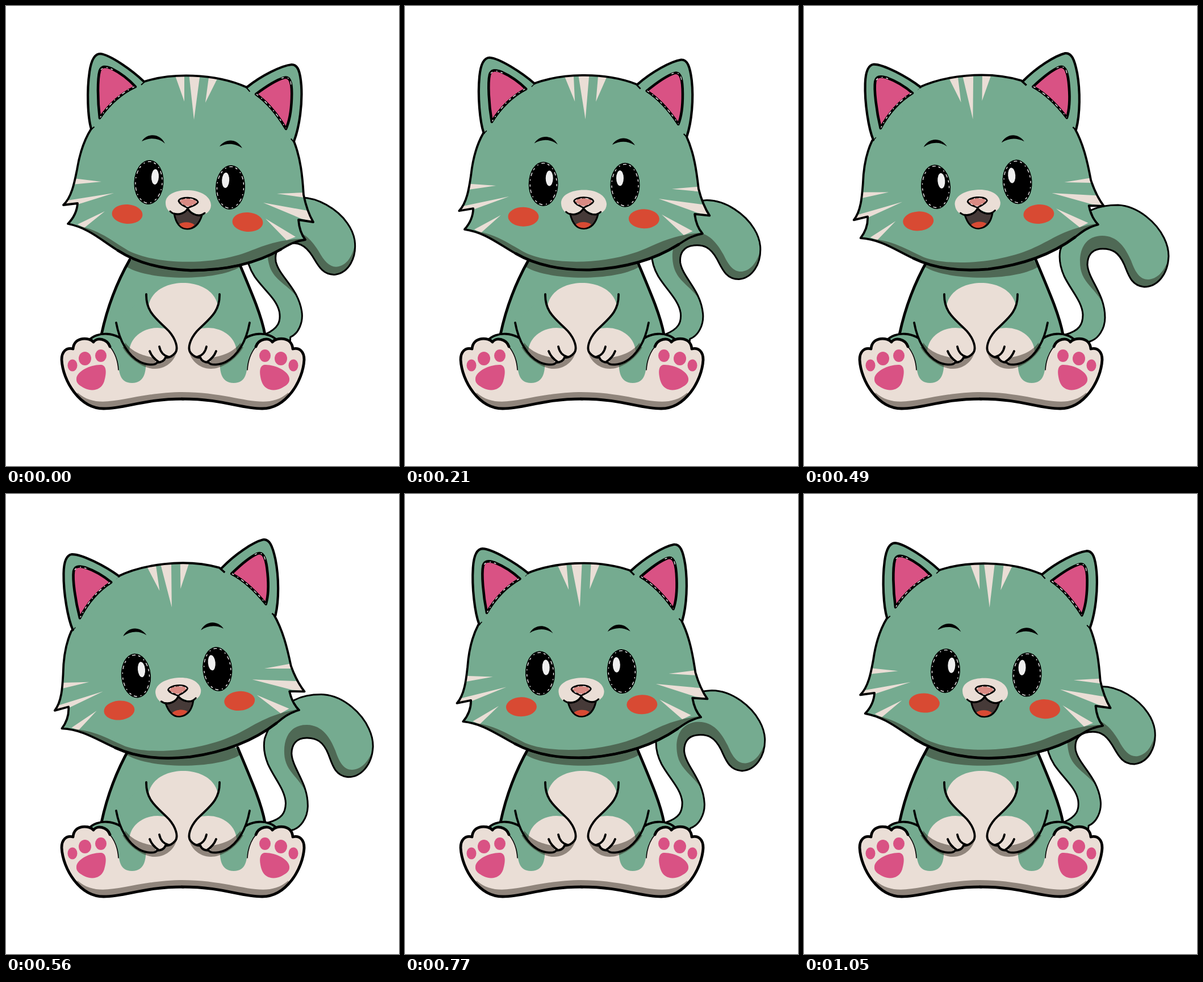
Write an HTML page that moves like this. It is 692 by 809 pixels and loops after 1120 ms.

```html
<!DOCTYPE html>
<html lang="en">
<head>
<meta charset="utf-8">
<title>Swaying kitten</title>
<style>
  html, body { margin: 0; width: 100%; height: 100%; overflow: hidden; background: #fff; }
  svg { display: block; width: 100vw; height: 100vh; }
  .green { fill: #75ab90; }
  .cream { fill: #eaded6; }
  .pink { fill: #d95284; }
  .red { fill: #d84a33; }
  .shade { fill: #23190f; fill-opacity: .45; }
  .line { fill: none; stroke: #000; stroke-width: 3.8; stroke-linecap: round; stroke-linejoin: round; }
  .thin { stroke-width: 3; }
  .thick { stroke-width: 4.8; }
  .ear { fill: #75ab90; stroke-width: 4.2; }
  .inner { fill: #d95284; stroke-width: 4.6; }
  .joint { stroke: #75ab90; stroke-width: 9; }
  .glint { fill: none; stroke: #fff; stroke-width: 1.3; stroke-dasharray: 4 7 2 6 6 5; }
</style>
</head>
<body>
<svg viewBox="0 0 692 809">
  <defs>
    <path id="tailShape" d="M500 362C515 353 535 350 553 350C590 352 622 383 634 408C640 420 642 430 642 440C641 472 622 494 599 494C576 492 571 472 564 455C554 432 542 427 526 427C506 427 499 440 499 455C501 482 530 506 530 548C530 568 518 586 503 590L496 620H455L460 578C485 571 491 560 491 543C490 520 470 500 458 475C450 457 449 442 451 430C460 400 480 375 500 362Z"/>
    <path id="headShape" d="M243 133C290 118 365 117 424 143L507 238C519 268 522 300 524 332C528 352 534 368 541 380L515 376C516 390 520 402 527 411C505 414 495 422 484 428C440 453 385 465 325 465C270 463 228 450 197 430C168 412 145 390 109 383C119 373 125 361 126 347L101 350C116 336 121 308 125 288C129 263 136 238 150 216Z"/>
    <path id="armShape" d="M247 507C246 540 268 552 287 572C299 586 304 602 298 610C292 617 286 619 281 618C278 626 270 627 266 627C262 633 246 631 236 626C215 615 200 590 194 557"/>
    <path id="footShape" d="M183 599C178 585 160 582 154 591C148 583 120 580 118 603C106 600 98 608 98 622C100 660 130 708 172 708C212 708 240 691 313 691"/>
    <clipPath id="tailClip"><use href="#tailShape"/></clipPath>
    <clipPath id="headClip"><use href="#headShape"/></clipPath>
    <clipPath id="armClip"><use href="#armShape"/></clipPath>
    <clipPath id="footClip"><path d="M183 599C178 585 160 582 154 591C148 583 120 580 118 603C106 600 98 608 98 622C100 660 130 708 172 708C212 708 240 691 313 691V599Z"/></clipPath>
  </defs>

  <g id="tail">
    <use href="#tailShape" class="green"/>
    <path class="shade" clip-path="url(#tailClip)" d="M529 530C518 500 492 490 487 462C482 430 495 404 525 404C552 404 566 425 576 448C584 470 592 481 606 481C622 480 633 468 642 446V500H560L540 440L505 440L506 470L540 520Z"/>
    <use href="#tailShape" class="line thin"/>
  </g>

  <path class="green" d="M218 446C190 495 176 540 168 582V610H456V582C450 545 435 510 408 446Z"/>
  <path class="cream" d="M312 487C340 487 368 500 373 527V610H251V527C256 500 284 487 312 487Z"/>
  <path class="shade" d="M213 459C255 484 370 484 412 459L400 440H225Z"/>
  <path class="line thick" d="M218 446C190 495 176 540 168 578M408 446C435 510 450 545 456 578"/>

  <g id="half">
    <path class="green" d="M146 589C160 572 195 572 212 592L200 610H146Z"/>
    <path class="line" d="M146 588C160 572 195 572 212 594"/>
    <g clip-path="url(#footClip)">
      <path class="cream" d="M90 570H313V720H90Z"/>
      <path class="shade" d="M126 680C168 716 215 679 313 679V720H110Z"/>
    </g>
    <path class="green" d="M183 599L207 588L246 625C247 640 245 663 222 663C199 663 200 642 197 630C195 615 190 606 183 599Z"/>
    <use href="#footShape" class="line thick"/>
    <path class="line" style="stroke-width:1.6" d="M183 599C192 610 197 622 198 640"/>
    <g class="pink">
      <ellipse cx="117" cy="632" rx="8.5" ry="10.5"/>
      <ellipse cx="139" cy="620" rx="11" ry="12"/>
      <ellipse cx="167" cy="615" rx="10" ry="11"/>
      <path d="M124 655C125 642 150 630 168 631C179 633 176 650 173 660C168 676 152 678 140 673C130 668 123 664 124 655Z"/>
    </g>
    <path class="shade" d="M205 600C220 625 245 638 262 638C285 638 300 620 301 604L260 600Z"/>
    <use href="#armShape" class="green"/>
    <g clip-path="url(#armClip)">
      <ellipse class="cream" cx="267" cy="609" rx="50" ry="43"/>
      <path class="shade" d="M210 592C225 612 245 615 262 619L266 640H200Z"/>
    </g>
    <use href="#armShape" class="line"/>
    <path class="line" d="M253 607C256 615 261 621 269 626M270 599C272 609 278 615 286 617"/>
  </g>
  <use href="#half" transform="translate(623 0) scale(-1 1)"/>

  <g id="head">
    <use href="#headShape" class="green"/>
    <g clip-path="url(#headClip)">
      <path class="cream" d="M297 120L314 118V168ZM322 118H342L331 200ZM358 118L375 122L351 170Z"/>
      <path class="cream" d="M118 303L168 309L116 314ZM190 329L108 342L98 352L126 349ZM174 361L126 384L138 390Z"/>
      <path class="cream" d="M477 330L526 328V337ZM453 346L531 360L540 379L520 374ZM457 374L510 406L494 412Z"/>
      <path class="shade" d="M105 383C160 389 180 409 215 430C260 453 345 456 405 439C440 430 465 410 530 409V475H105Z"/>
    </g>
    <use href="#headShape" class="line"/>
    <path class="line thick" d="M197 430C228 450 270 463 325 465C385 465 440 453 484 428"/>

    <path d="M239 238C248 224 270 222 280 242C268 231 252 231 239 238ZM376 247C386 233 406 232 416 250C402 241 390 241 376 247Z"/>
    <g id="eyes"></g>

    <ellipse class="red" cx="213.500" cy="366" rx="27" ry="17" transform="rotate(3.600 213.500 366)"/>
    <ellipse class="red" cx="425.500" cy="380" rx="27" ry="17" transform="rotate(3.600 425.500 380)"/>

    <path class="cream" d="M281 346C281 331 300 323 322 324C345 325 361 336 361 351C360 364 348 369 337 367L320 358L303 366C291 367 281 359 281 346Z"/>
    <path class="line thin" style="fill:#463a38" d="M296 365C299 381 306 392 319 392C333 392 341 381 345 368C335 370 326 365 320 357C315 364 306 368 296 365Z"/>
    <path class="red" d="M305 384C311 379 325 379 332 385C325 393 312 393 305 384Z"/>
    <path class="line thin" d="M289 361C298 370 314 367 320 356C326 367 340 372 350 364"/>
    <path class="line thin" style="fill:#d98a83" d="M304 343C306 335 335 335 338 345C336 350 326 353 320 355C314 352 306 349 304 343Z"/>
    <path class="glint" style="stroke-width:1" d="M306 343C308 337 333 337 336 345C334 349 326 351 320 353C314 351 308 348 306 343Z"/>
  </g>

  <g id="ears">
    <path class="joint" d="M239 140L156 213M429 151L501 234"/>
    <path class="line ear" d="M150 216C144 196 142 150 147 116C150 95 156 84 166 84C184 86 222 113 243 133"/>
    <path class="line ear" d="M424 143C450 122 485 105 503 103C514 103 518 115 520 140C522 172 517 212 507 238"/>
    <path class="line inner" d="M165 197C161 165 161 128 165 114C168 106 174 105 186 110C202 118 218 131 228 142C200 155 181 174 165 197Z"/>
    <path class="line inner" d="M440 155C456 143 476 130 490 126C502 123 504 140 503 163C502 190 498 205 493 216C478 191 460 169 440 155Z"/>
    <path class="glint" d="M226 142C199 155 181 173 166 196M167 112C173 106 180 108 188 112M441 155C460 169 478 191 493 215M485 127C497 123 502 129 502 140"/>
  </g>
</svg>
<script>
  const STEP = 70, STEPS = 16;
  const [head, ears, tail] = ['head', 'ears', 'tail'].map(id => document.getElementById(id));

  const oval = (x, y, rx, ry, attrs) => `<ellipse cx="${x}" cy="${y}" rx="${rx}" ry="${ry}" ${attrs}/>`;
  const eye = (x, y, shineX, shineY) => `<g transform="rotate(3 ${x} ${y})">` +
    oval(x, y, 26, 39, 'fill="#000"') +
    oval(x, y, 23.5, 36.5, 'class="glint"') +
    oval(shineX, shineY, 6.5, 13.5, 'fill="#eee"') + '</g>';
  document.getElementById('eyes').innerHTML = eye(251.5, 310, 262, 300) + eye(395, 319, 386, 307);

  const turn = (part, angle, x, y) => part.setAttribute('transform', `rotate(${angle} ${x} ${y})`);

  // Sway angle in degrees, growing slightly faster toward the far side.
  const sway = n => 0.88 * n + 0.019 * n * n;
  const TAIL_REST = sway(7);

  function draw(time) {
    const step = Math.floor(time / STEP) % STEPS;
    const angle = sway(Math.min(step, STEPS - step));
    turn(head, -angle, 307, 471);
    turn(ears, -0.92 * angle, 307, 471); // the ears trail the head a little
    turn(tail, 1.3 * (angle - TAIL_REST), 455, 600);
  }

  const start = performance.now();
  function tick() {
    draw(performance.now() - start);
    requestAnimationFrame(tick);
  }
  tick();
</script>
</body>
</html>
```
